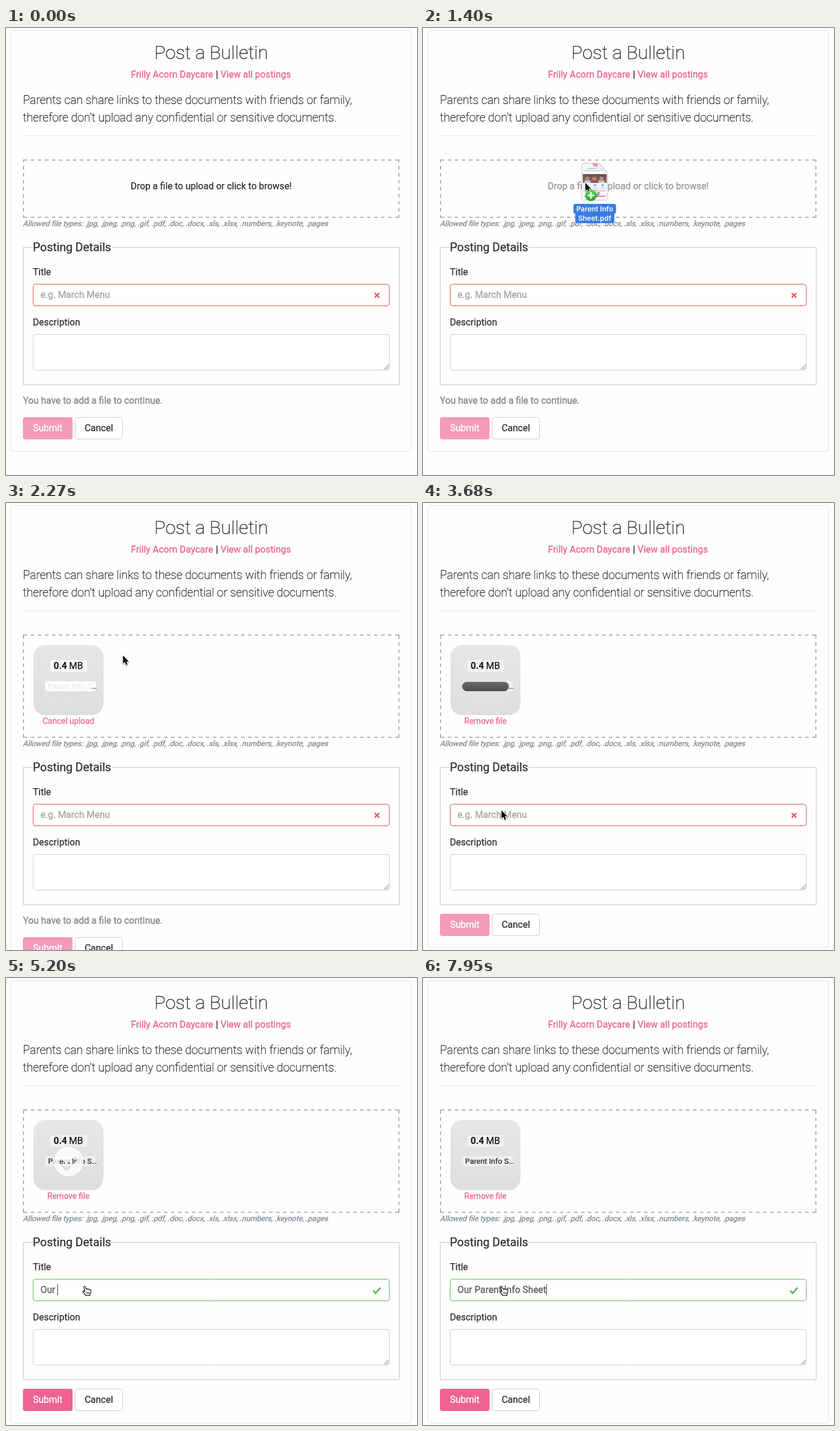
Recreate the animation shown at these times as an HTML page with a canvas. Size 704 by 765 pixels, loop 8000 ms.

```html
<!DOCTYPE html>
<html lang="en">
<head>
<meta charset="utf-8">
<title>Post a Bulletin</title>
<style>
html, body { margin: 0; width: 100%; height: 100%; overflow: hidden; background: #fefefe; }
canvas { display: block; }
</style>
</head>
<body>
<canvas id="stage" width="704" height="765"></canvas>
<script>
const ctx = document.getElementById('stage').getContext('2d');
const LOOP = 8000, OVER = 1040, DROP = 2150, DONE = 3510, VALID = 4780;
const PINK = '#f06292', INK = '#292b2c', GREY = '#818a91';
const RED = '#d9534f', GREEN = '#5cb85c', LINE = '#cccccc';

// Pointer keys: time, x, y
const PATH = [
  [500, 690, 622], [620, 655, 380], [760, 595, 190], [860, 545, 152],
  [980, 485, 190], [1110, 422, 237], [1280, 332, 253], [1400, 278, 265],
  [1600, 225, 267], [1850, 202, 264], [2090, 200, 262], [2270, 200, 261],
  [2500, 195, 276], [2930, 168, 369], [2990, 158, 420], [3050, 143, 505],
  [3100, 134, 526], [8000, 134, 526]
];
const TYPED = 'Our Parent Info Sheet';
const KEYS = [4780, 4960, 5080, 5200, 5550, 5730, 5910, 6080, 6260, 6430, 6610,
  6790, 6960, 7080, 7190, 7310, 7490, 7610, 7720, 7890, 7950];

const clamp = v => Math.max(0, Math.min(1, v));
const span = (t, a, b) => clamp((t - a) / (b - a));

function bezier(p, x1, y1, x2, y2) {
  const at = (u, a, b) => 3 * u * (1 - u) * (1 - u) * a + 3 * u * u * (1 - u) * b + u * u * u;
  let lo = 0, hi = 1;
  for (let i = 0; i < 24; i++) {
    const mid = (lo + hi) / 2;
    if (at(mid, x1, x2) < p) lo = mid; else hi = mid;
  }
  return at(lo, y1, y2);
}
const swing = p => bezier(p, 0.77, 0, 0.175, 1);

function pointer(t) {
  const last = PATH.length - 1;
  if (t >= PATH[last - 1][0]) return PATH[last].slice(1);
  let i = 0;
  while (t >= PATH[i + 1][0]) i++;
  const a = PATH[i], b = PATH[i + 1], dt = b[0] - a[0], u = (t - a[0]) / dt;
  const slope = (k, c) => {
    const p = PATH[Math.max(0, k - 1)], n = PATH[k + 1];
    return (n[c] - p[c]) / (n[0] - p[0]) * dt;
  };
  return [1, 2].map(c => {
    const m = slope(i, c), n = i + 1 >= last - 1 ? 0 : slope(i + 1, c);
    return (2 * u ** 3 - 3 * u * u + 1) * a[c] + (u ** 3 - 2 * u * u + u) * m
      + (3 * u * u - 2 * u ** 3) * b[c] + (u ** 3 - u * u) * n;
  });
}

function text(str, x, y, { size = 16, weight = 400, color = INK, bold = 0.25, align = 'left', face = 'Roboto' } = {}) {
  ctx.font = `${weight} ${size}px ${face}, sans-serif`;
  ctx.textAlign = align;
  ctx.fillStyle = ctx.strokeStyle = color;
  ctx.fillText(str, x, y);
  if (bold) {
    ctx.lineWidth = bold;
    ctx.lineJoin = 'round';
    ctx.strokeText(str, x, y);
  }
}

function box(x, y, w, h, r, fill, stroke) {
  const d = stroke ? 0.5 : 0;
  ctx.beginPath();
  ctx.roundRect(x + d, y + d, w - 2 * d, h - 2 * d, r);
  if (fill) { ctx.fillStyle = fill; ctx.fill(); }
  if (stroke) { ctx.strokeStyle = stroke; ctx.lineWidth = 1; ctx.stroke(); }
}

function poly(pts, { fill, stroke, width = 1, close = false }) {
  ctx.beginPath();
  pts.forEach(([x, y]) => ctx.lineTo(x, y));
  if (close) ctx.closePath();
  if (fill) { ctx.fillStyle = fill; ctx.fill(); }
  if (stroke) { ctx.strokeStyle = stroke; ctx.lineWidth = width; ctx.stroke(); }
}

function shade(y0, y1, c0, c1) {
  const g = ctx.createLinearGradient(0, y0, 0, y1);
  g.addColorStop(0, c0);
  g.addColorStop(1, c1);
  return g;
}

function at(x, y, draw) {
  ctx.save();
  ctx.translate(x, y);
  draw();
  ctx.restore();
}

function header() {
  const thin = { weight: 100, color: '#1f2122' };
  text('Post a Bulletin', 351.5, 53, { ...thin, size: 32, bold: 0.45, align: 'center' });
  const link = { color: PINK, bold: 0.35 };
  text('Frilly Acorn Daycare', 214, 85, link);
  text('|', 359.6, 85);
  text('View all postings', 367.5, 85, link);
  const lead = { ...thin, size: 20, bold: 0.4 };
  text('Parents can share links to these documents with friends or family,', 29, 130, lead);
  text("therefore don't upload any confidential or sensitive documents.", 29, 160, lead);
  ctx.fillStyle = '#e5e5e5';
  ctx.fillRect(29, 184, 645, 1);
}

// Two-pixel dashes, centred between solid corners
function dashedFrame(x, y, w, h) {
  const dash = 6;
  ctx.save();
  ctx.fillStyle = ctx.strokeStyle = '#b3b3b3';
  ctx.lineWidth = 2;
  ctx.setLineDash([dash, dash]);
  for (const [dx, dy] of [[0, 0], [w - 2, 0], [0, h - 2], [w - 2, h - 2]]) ctx.fillRect(x + dx, y + dy, 2, 2);
  const edge = (x0, y0, x1, y1) => {
    const len = x1 - x0 + y1 - y0;
    ctx.lineDashOffset = (dash - len % dash) / 2;
    poly([[x0, y0], [x1, y1]], { stroke: '#b3b3b3', width: 2 });
  };
  for (const ey of [y + 1, y + h - 1]) edge(x + 2, ey, x + w - 2, ey);
  for (const ex of [x + 1, x + w - 1]) edge(ex, y + 2, ex, y + h - 2);
  ctx.restore();
}

function dropZone(t, h) {
  dashedFrame(29, 225, 645, h);
  if (t < DROP) {
    text('Drop a file to upload or click to browse!', 351.5, 276,
      { align: 'center', color: t < OVER ? INK : '#919394' });
  } else preview(t);
  ctx.save();
  ctx.transform(1, 0, -0.25, 1, 29, 239 + h);
  text('Allowed file types: .jpg, .jpeg, .png, .gif, .pdf, .doc, .docx, .xls, .xlsx, .numbers, .keynote, .pages',
    0, 0, { size: 12.8, color: GREY, bold: 0.35 });
  ctx.restore();
}

function checkMark(t) {
  const p = (t - DONE) / 3000;
  if (p <= 0 || p >= 1) return;
  const come = swing(clamp(p / 0.3)), go = swing(span(p, 0.7, 1));
  ctx.save();
  ctx.globalAlpha = come * (1 - go);
  ctx.translate(80, 287 + 40 * (1 - come) - 40 * go);
  ctx.beginPath();
  ctx.arc(27, 27, 26, 0, 7);
  ctx.closePath();
  const tick = [[14.8, 23.1, 3.5], [23.5, 31.8, 0.1], [37.7, 17.7, 3.5],
    [43.3, 23.3, 3.5], [23.5, 43.1, 3.5], [9.1, 28.8, 3.5]];
  ctx.moveTo(12, 26);
  tick.forEach(([x, y, r], i) => {
    const n = tick[(i + 1) % tick.length];
    ctx.arcTo(x, y, n[0], n[1], r);
  });
  ctx.closePath();
  ctx.fillStyle = 'rgba(255,255,255,0.82)';
  ctx.fill('evenodd');
  ctx.strokeStyle = 'rgba(116,116,116,0.2)';
  ctx.lineWidth = 1;
  ctx.stroke();
  ctx.restore();
}

function progress(t) {
  const fade = bezier(span(t, 3620, 4020), 0.42, 0, 1, 1);
  if (fade >= 1) return;
  ctx.save();
  ctx.globalAlpha = 1 - fade;
  ctx.beginPath();
  ctx.roundRect(67, 306, 80, 16, 8);
  ctx.clip();
  ctx.fillStyle = 'rgba(255,255,255,0.9)';
  ctx.fillRect(67, 306, 80, 16);
  ctx.fillStyle = shade(306, 322, '#666', '#444');
  ctx.fillRect(67, 306, 80 * span(t, 2330, 2850), 16);
  ctx.restore();
}

function preview(t) {
  const pill = `rgba(255,255,255,${t < DONE ? 0.8 : 0.45})`, black = '#111';
  box(47, 243, 120, 120, 20, shade(243, 363, '#e7e7e7', '#dedede'));
  box(76, 269, 63, 20, 3, pill);
  text('0.4', 81.5, 284, { weight: 700, color: black, bold: 0 });
  text(' MB', 104, 284, { color: black });
  box(67, 305, 87, 17, 3, pill);
  text('Parent Info S…', 72, 318, { size: 13, color: black, bold: 0.1 });
  checkMark(t);
  progress(t);
  text(t < DONE ? 'Cancel upload' : 'Remove file', 107, 378,
    { size: 14, color: PINK, align: 'center' });
}

function titleField(t) {
  const ok = t >= VALID;
  text('Title', 46, 423);
  box(46, 438, 611, 38, 4, '#fff', ok ? GREEN : RED);
  const typed = TYPED.slice(0, KEYS.filter(k => t >= k).length);
  if (typed) text(typed, 59, 462, { color: '#55595c', bold: 0.3 });
  else text('e.g. March Menu', 59, 462, { color: '#a6a6a6', bold: 0.4 });
  if (t >= 4380) {
    ctx.font = '400 16px Roboto, sans-serif';
    ctx.fillStyle = '#333';
    ctx.fillRect(Math.round(59 + ctx.measureText(typed).width), 447, 1, 19);
  }
  if (ok) {
    poly([[629, 458], [633, 462.5], [641.5, 453]], { stroke: GREEN, width: 2.7 });
  } else {
    poly([[631.5, 453.5], [639.5, 461.5]], { stroke: RED, width: 2.3 });
    poly([[639.5, 453.5], [631.5, 461.5]], { stroke: RED, width: 2.3 });
  }
}

function details(t) {
  poly([[46, 375.5], [29.5, 375.5], [29.5, 610.5], [673.5, 610.5], [673.5, 375.5], [181, 375.5]],
    { stroke: '#c4c4c4' });
  text('Posting Details', 46, 382, { size: 20 });
  titleField(t);
  text('Description', 46, 509);
  box(46, 524, 611, 62, 4, '#fff', LINE);
  poly([[647.5, 584.5], [655.5, 576.5]], { stroke: '#666' });
  poly([[651.5, 584.5], [655.5, 580.5]], { stroke: '#666' });
}

function buttons(t, y) {
  box(29, y, 85, 38, 4, t < VALID ? '#f59bb8' : PINK);
  text('Submit', 71.5, y + 24, { color: '#fff', bold: 0.4, align: 'center' });
  box(118, y, 82, 38, 4, '#fff', LINE);
  text('Cancel', 159, y + 24, { align: 'center' });
}

// Dragged document, placed relative to the pointer tip
function page() {
  const sheet = [[-5, -33], [24, -33], [38, -18], [38, 29], [-5, 29]];
  ctx.globalAlpha = 0.93;
  ctx.shadowColor = 'rgba(0,0,0,0.35)';
  ctx.shadowBlur = 3;
  poly(sheet, { fill: '#fff', close: true });
  ctx.shadowColor = 'transparent';
  poly(sheet, { stroke: '#d2d2d2', width: 0.7, close: true });
  poly([[12, -33], [22, -33], [21, -27], [15, -28]], { fill: '#e58aa8', close: true });
  ctx.fillStyle = '#8fc3e6';
  ctx.fillRect(4, -25.5, 16, 1.5);
  ctx.fillRect(-1, -21.5, 26, 1);
  ctx.fillStyle = shade(-15, 0, '#5b413d', '#86605a');
  ctx.fillRect(-4, -15, 41, 15);
  for (const [x, shirt] of [[3, '#d9cfd2'], [15, '#a8434c'], [27, '#d9cfd2']]) {
    ctx.fillStyle = shirt;
    ctx.fillRect(x - 4, -4, 10, 4);
    ctx.fillStyle = '#b98d7c';
    ctx.beginPath();
    ctx.arc(x + 1, -7, 3.6, 0, 7);
    ctx.fill();
  }
  for (const x of [0, 13, 26]) {
    ctx.fillStyle = '#7eb6e4';
    ctx.fillRect(x + 2, 2, 4, 4);
    ctx.fillStyle = '#c9ccd3';
    ctx.fillRect(x, 8, 9, 1);
    ctx.fillRect(x + 1, 10, 7, 1);
  }
  ctx.fillStyle = '#e87ba0';
  ctx.fillRect(-2, 13, 38, 1.2);
  ctx.fillRect(-1, 22, 36, 2);
  text('PDF', 16.5, 24, { size: 10, weight: 700, color: '#666', align: 'center', bold: 0 });
  poly([[24, -33], [38, -18], [26, -21]], { fill: shade(-33, -18, '#fff', '#dcdcdc'), stroke: '#ccc', width: 0.6, close: true });
  const blue = '#337ce0', label = { size: 12, weight: 600, color: '#fff', align: 'center', face: 'Inter', bold: 0 };
  ctx.globalAlpha = 0.98;
  box(-20, 36, 73, 17, 4, blue);
  box(-17, 51, 67, 18, 4, blue);
  text('Parent Info', 16.5, 49, label);
  text('Sheet.pdf', 16.5, 65, label);
}

function plusBadge() {
  ctx.beginPath();
  ctx.arc(10, 21.5, 9.5, 0, 7);
  ctx.fillStyle = shade(12, 31, '#6fdc66', '#17a81c');
  ctx.fill();
  ctx.strokeStyle = '#1d9322';
  ctx.lineWidth = 0.7;
  ctx.stroke();
  ctx.fillStyle = '#fff';
  ctx.fillRect(4.5, 20, 11, 3);
  ctx.fillRect(8.5, 16, 3, 11);
}

function arrow() {
  const shape = [[0.5, 0], [0.5, 14], [3.7, 11], [6, 16.3], [8.3, 15.3], [6, 10.2], [10.3, 10.2]];
  ctx.lineJoin = 'round';
  ctx.shadowColor = 'rgba(0,0,0,0.4)';
  ctx.shadowBlur = 2;
  ctx.shadowOffsetY = 1;
  poly(shape, { stroke: '#fff', width: 2, close: true });
  ctx.shadowColor = 'transparent';
  poly(shape, { fill: '#000', close: true });
}

function hand() {
  ctx.lineJoin = ctx.lineCap = 'round';
  ctx.beginPath();
  ctx.moveTo(1.2, 11);
  ctx.lineTo(-0.8, 3);
  ctx.quadraticCurveTo(-0.6, 0.8, 1.4, 2);
  ctx.lineTo(3.6, 7);
  ctx.quadraticCurveTo(5.2, 4.8, 6.4, 7);
  ctx.quadraticCurveTo(8.3, 5.4, 9, 7.7);
  ctx.quadraticCurveTo(11.5, 6.8, 11.4, 9.5);
  ctx.quadraticCurveTo(11.6, 13, 9.8, 15);
  ctx.lineTo(9.8, 17.5);
  ctx.lineTo(2.5, 17.5);
  ctx.quadraticCurveTo(1.5, 14.5, -2, 11.5);
  ctx.quadraticCurveTo(-3, 8.8, -0.5, 9.5);
  ctx.closePath();
  ctx.fillStyle = '#fff';
  ctx.fill();
  ctx.strokeStyle = '#000';
  ctx.lineWidth = 1.1;
  ctx.stroke();
  for (const x of [4, 6.2, 8.3]) poly([[x, 11.5], [x + 0.2, 15]], { stroke: '#000', width: 0.8 });
}

function draw(t) {
  const shift = t < DROP ? 0 : 77, hint = t < DONE;
  const btnY = (hint ? 666 : 626) + shift;
  ctx.fillStyle = '#fefefe';
  ctx.fillRect(0, 0, 704, 765);
  box(8, 4, 687, btnY + 55, 4, null, '#e2e2e2');
  header();
  dropZone(t, 100 + shift);
  at(0, shift, () => details(t));
  if (hint) text('You have to add a file to continue.', 29, 643 + shift, { color: GREY, bold: 0.4 });
  buttons(t, btnY);
  if (t < PATH[0][0]) return;
  const [x, y] = pointer(t);
  if (t < DROP) at(x, y, page);
  at(x, y, t < VALID ? arrow : hand);
  if (t >= OVER && t < DROP) at(x, y, plusBadge);
}

const start = performance.now();
function frame() {
  draw((performance.now() - start) % LOOP);
  requestAnimationFrame(frame);
}
frame();
</script>
</body>
</html>
```
